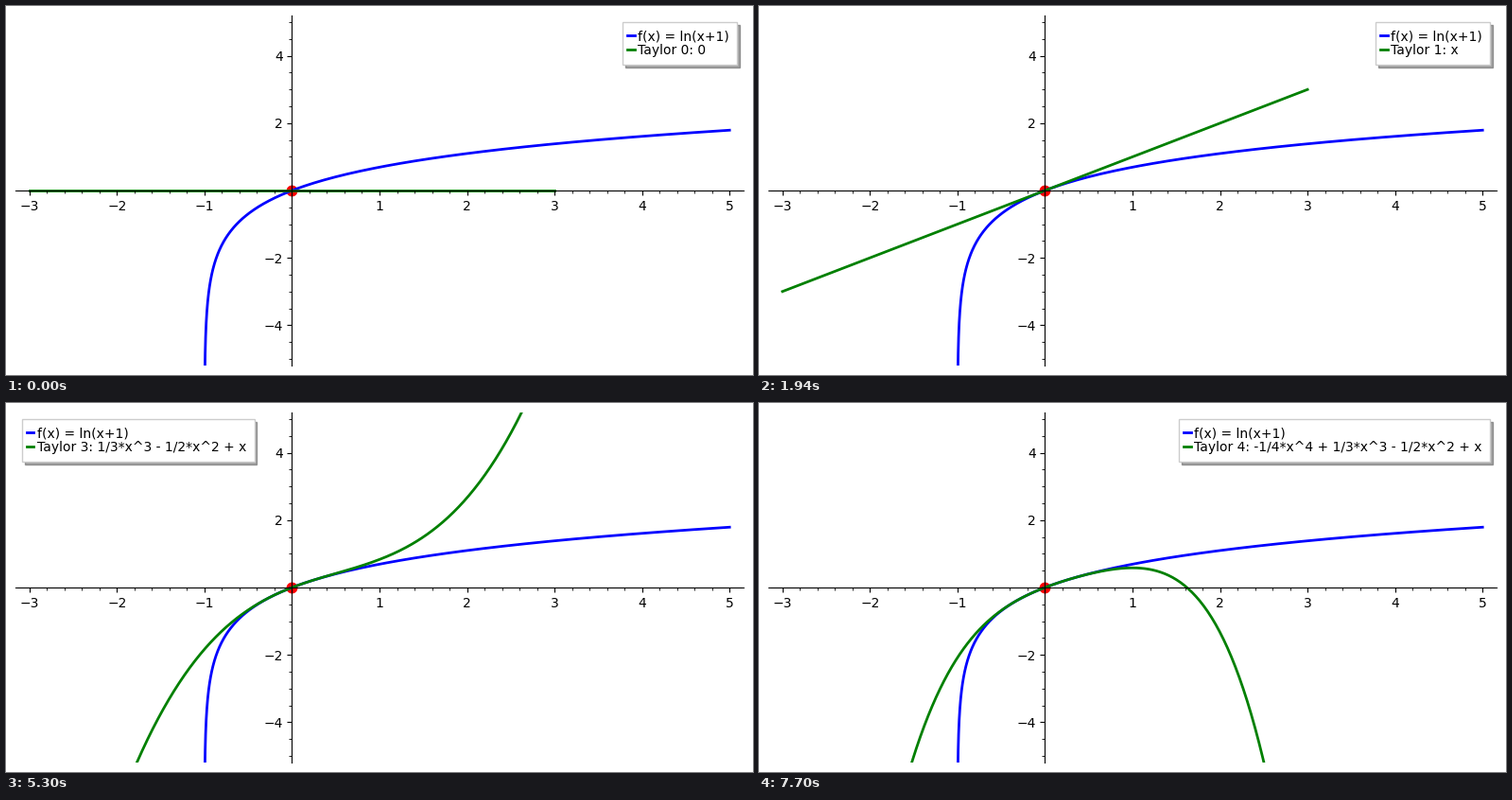
Animation, 790 px wide and 390 px high, one loop 8 s. Source, as a matplotlib script:

```python
import matplotlib.pyplot as plt
import numpy as np
from matplotlib.animation import FuncAnimation
from matplotlib.ticker import AutoMinorLocator, MultipleLocator

W, H, DPI, PAD = 790, 390, 100, 10
STEP_MS, LOOP_MS = 100, 8000
CHANGES = [500, 2900, 5300, 7700]  # ms at which the degree goes up by one
FORMULAS = [
    "0",
    "x",
    "-1/2*x^2 + x",
    "1/3*x^3 - 1/2*x^2 + x",
    "-1/4*x^4 + 1/3*x^3 - 1/2*x^2 + x",
]

plt.rcParams.update({"font.family": "DejaVu Sans", "font.size": 10})


def taylor(x, degree):
    """Partial sum of the series of ln(1 + x) around 0."""
    return sum(((-1) ** (k + 1) * x**k / k for k in range(1, degree + 1)),
               np.zeros_like(x))


def tick_label(value, _pos):
    return f"{value:g}".replace("-", "\u2212") if abs(value) > 1e-9 else ""


def style_axes(ax):
    ax.set_xlim(-3.16, 5.16)
    ax.set_ylim(-5.2, 5.2)
    for side in ("top", "right"):
        ax.spines[side].set_visible(False)
    for side in ("left", "bottom"):
        ax.spines[side].set_position(("data", 0))
    for axis, step, parts in ((ax.xaxis, 1, 5), (ax.yaxis, 2, 4)):
        axis.set_major_locator(MultipleLocator(step))
        axis.set_minor_locator(AutoMinorLocator(parts))
        axis.set_major_formatter(tick_label)


fig = plt.figure(figsize=(W / DPI, H / DPI), dpi=DPI, facecolor="white")
ax = fig.add_axes([PAD / W, PAD / H, 1 - 2 * PAD / W, 1 - 2 * PAD / H])
style_axes(ax)

# The axes stay above the curves, the curves above the point.
ax.scatter([0], [0], s=50, color="red", linewidths=1.5, zorder=0)
log_y = np.linspace(-7, np.log(6), 500)
log_line, = ax.plot(np.expm1(log_y), log_y, color="blue", lw=2, zorder=1)
xs = np.linspace(-3, 3, 401)
poly_line, = ax.plot(xs, taylor(xs, 0), color="green", lw=2, zorder=1)


def draw(frame):
    degree = int(np.searchsorted(CHANGES, frame * STEP_MS, side="right"))
    poly_line.set_ydata(taylor(xs, degree))
    ax.legend(
        [log_line, poly_line],
        ["f(x) = ln(x+1)", f"Taylor {degree}: {FORMULAS[degree]}"],
        loc="upper left" if degree == 3 else "upper right",
        numpoints=2, handlelength=0.05, handletextpad=0.5,
        labelspacing=0.02, borderpad=0.6, borderaxespad=0.5,
        fancybox=False, shadow=True, framealpha=1,
    )
    return []


anim = FuncAnimation(fig, draw, frames=LOOP_MS // STEP_MS, interval=STEP_MS,
                     init_func=lambda: draw(0), repeat=True, repeat_delay=0)
plt.show()
```
